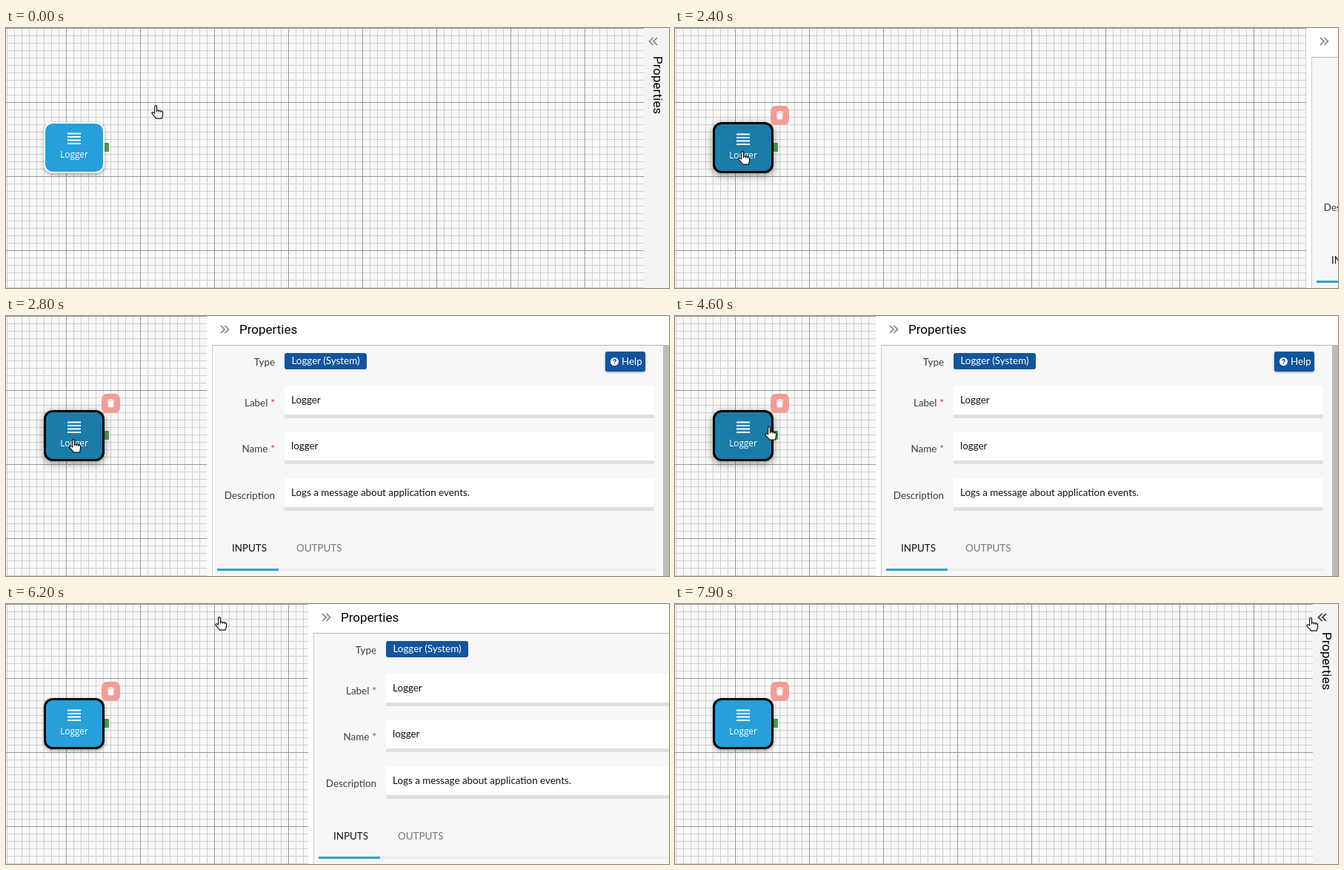
An HTML page that plays this animation: 895x351 px, repeating every 8000 ms.

```html
<!DOCTYPE html>
<html lang="en">
<head>
<meta charset="utf-8">
<title>Flow editor</title>
<style>
  html, body { margin: 0; width: 100%; height: 100%; overflow: hidden; }
  body { position: relative; font: 13.4px/18px Lato, "Open Sans", sans-serif; color: #111; }
  div, svg, span { position: absolute; box-sizing: border-box; white-space: nowrap; }
  svg { overflow: visible; }
  .node, .bin, .panel, .tab, .cursor, .hand, .resize, .back, .back svg, .tab svg {
    animation: 8s step-end infinite;
  }

  #stage {
    inset: 0; overflow: hidden;
    background:
      linear-gradient(90deg, #989898 1px, transparent 1px) 81px 0 / 100px 100px,
      linear-gradient(#989898 1px, transparent 1px) 0 0 / 100px 100px,
      linear-gradient(90deg, #cfcfcf 1px, transparent 1px) 1px 0 / 10px 10px,
      linear-gradient(#cfcfcf 1px, transparent 1px) 0 0 / 10px 10px,
      #f8f8f8;
  }

  .port { left: 133px; top: 155px; width: 6px; height: 12px; background: #4fa052; }
  .node {
    left: 51px; top: 127px; width: 82px; height: 69px; border-radius: 12px;
    border: 2px solid #fff; background: #26a0da; color: #fff;
    animation-name: node;
  }
  .node svg { left: 50%; top: 12px; margin-left: -9px; }
  .node span { left: 0; right: 0; top: 32px; text-align: center; font: 11.8px/18px "Open Sans", sans-serif; }
  .bin {
    left: 129px; top: 105px; width: 25px; height: 26px; border-radius: 7px;
    background: #f29d97; animation-name: bin;
  }

  .panel { left: 271px; top: 0; width: 624px; height: 351px; background: #fff; animation-name: panel; }
  .title { font: 17px/20px Roboto, sans-serif; color: #000; }
  .panel .title { left: 44px; top: 8px; }
  .body {
    left: 7px; top: 39px; width: 617px; height: 312px; background: #f7f7f7;
    border-left: 1px solid #ccc; border-top: 1px solid #b4b4b4;
  }
  .bar { right: 0; top: 40px; width: 8px; height: 311px; background: #bcbcbc; }
  .label { right: 532px; color: #3c3c3c; }
  .label b { color: #d9302c; font-weight: 400; margin-left: 4px; }
  .field {
    left: 105px; width: 499px; height: 44px; padding: 10px 9px;
    background: #fff; border-bottom: 5px solid #e0e0e0;
  }
  .badge {
    left: 105px; top: 50px; width: 111px; height: 22px; border-radius: 3px;
    background: #12559c; color: #fff; text-align: center; line-height: 21px;
  }
  .help {
    left: 538px; top: 48px; width: 54px; height: 27px; border-radius: 3px;
    background: #12559c; color: #fff; line-height: 27px; padding-left: 22px;
    box-shadow: 0 1px 3px rgba(0, 0, 0, .4);
  }
  .help svg { left: 7px; top: 8px; }
  .line { left: 14px; top: 341px; width: 594px; height: 3px; background: #ededed; }
  .line div { width: 83px; height: 3px; background: #26a0da; }
  .back { left: 14px; top: 8px; width: 20px; height: 20px; border-radius: 2px; animation-name: back; }
  .back svg { left: 4px; top: 4px; animation-name: backIcon; }
  .chevrons { fill: none; stroke: #808080; stroke-width: 1.7; }

  .tab { left: 861px; top: 0; width: 34px; height: 351px; background: #f4f4f4; animation-name: tab; }
  .tab svg { left: 6px; top: 12px; animation-name: tabIcon; }
  .tab .title { left: 9px; top: 38px; width: 20px; writing-mode: vertical-rl; }

  .cursor { left: 0; top: 0; animation-name: cursor; }
  .hand { animation-name: hand; }
  .resize { left: -3px; top: -5px; visibility: hidden; animation-name: resize; }
  .hand, .resize { fill: #fff; stroke: #111; stroke-width: 1.2; stroke-linejoin: round; }

  @keyframes node {
    0% { background: #26a0da; border: 2px solid #fff; box-shadow: 0 2px 5px rgba(0, 0, 0, .35); }
    10% { background: #1b7ca9; border: 2px solid #12384d; box-shadow: 0 3px 11px rgba(0, 0, 0, .42); }
    25% { background: #1b7ca9; border: 3px solid #000; box-shadow: 0 3px 11px rgba(0, 0, 0, .42); }
    58.75%, to { background: #26a0da; border: 3px solid #000; box-shadow: 0 2px 5px rgba(0, 0, 0, .35); }
  }
  @keyframes bin { 0% { visibility: hidden; } 25%, to { visibility: visible; } }
  @keyframes panel {
    0% { visibility: hidden; transform: none; }
    30% { visibility: visible; transform: translateX(581px); }
    31.25% { visibility: visible; transform: translateX(450px); }
    32.5% { visibility: visible; transform: translateX(198px); }
    33.75% { visibility: visible; transform: translateX(31px); }
    35% { visibility: visible; transform: none; }
    76.25% { visibility: visible; transform: translateX(8px); }
    77.5% { visibility: visible; transform: translateX(137px); }
    78.75% { visibility: visible; transform: translateX(386px); }
    80% { visibility: visible; transform: translateX(555px); }
    81.25%, to { visibility: hidden; transform: none; }
  }
  @keyframes tab { 0%, 81.25%, to { visibility: visible; } 30% { visibility: hidden; } }
  @keyframes back { 0%, 77.5%, to { background: #fff; } 70% { background: #ececec; } }
  @keyframes backIcon { 0%, 77.5%, to { stroke: #808080; } 70% { stroke: #333; } }
  @keyframes tabIcon { 0% { stroke: #808080; } 98.75%, to { stroke: #333; } }
  @keyframes hand { 0%, 68.75%, to { visibility: visible; } 66.25% { visibility: hidden; } }
  @keyframes resize { 0%, 68.75%, to { visibility: hidden; } 66.25% { visibility: visible; } }
  @keyframes cursor {
    0% { transform: translate(196px, 104px); }
    5% { transform: translate(192px, 106px); }
    7.5% { transform: translate(172px, 112px); }
    8.75% { transform: translate(140px, 126px); }
    10% { transform: translate(118px, 138px); }
    11.25% { transform: translate(107px, 145px); }
    13.75% { transform: translate(92px, 160px); }
    15% { transform: translate(85px, 166px); }
    57.5% { transform: translate(121px, 149px); animation-timing-function: steps(7); }
    66.25% { transform: translate(266px, 34px); }
    68.75% { transform: translate(275px, 24px); }
    70% { transform: translate(282px, 17px); }
    85% { transform: translate(282px, 17px); animation-timing-function: steps(5); }
    91.25% { transform: translate(600px, 36px); animation-timing-function: steps(4); }
    96.25% { transform: translate(843px, 21px); }
    97.5% { transform: translate(848px, 20px); }
    98.75%, to { transform: translate(852px, 18px); }
  }
</style>
</head>
<body>
<div id="stage">
  <div class="port"></div>
  <div class="node">
    <svg width="18" height="17" stroke="#fff" stroke-width="2"><path d="M0 1.5h18M0 6h18M0 10.5h18M0 15h18"/></svg>
    <span>Logger</span>
  </div>
  <div class="bin">
    <svg width="25" height="26" fill="#fff"><path d="M8 8h2.8l.6-1h2.4l.6 1H17v1.3H8zM8.7 10h7.6v7q0 1.2-1.2 1.2H9.9q-1.2 0-1.2-1.2z"/></svg>
  </div>

  <div class="panel">
    <div class="back"><svg class="chevrons" width="13" height="12"><path d="M1 1l5 5-5 5M6.5 1l5 5-5 5"/></svg></div>
    <span class="title">Properties</span>
    <div class="body"></div>
    <div class="bar"></div>
    <span class="label" style="top:53px">Type</span>
    <div class="badge">Logger (System)</div>
    <div class="help">
      <svg width="11" height="11"><circle cx="5.5" cy="5.5" r="5.5" fill="#fff"/><path d="M3.7 4.3q.2-1.6 1.8-1.6 1.7 0 1.7 1.4 0 .8-.9 1.2-.8.4-.8 1.2M5.5 7.5v1.4" fill="none" stroke="#12559c" stroke-width="1.4"/></svg>
      Help
    </div>
    <span class="label" style="top:108px">Label<b>*</b></span>
    <div class="field" style="top:94px">Logger</div>
    <span class="label" style="top:170px">Name<b>*</b></span>
    <div class="field" style="top:156px">logger</div>
    <span class="label" style="top:233px">Description</span>
    <div class="field" style="top:219px">Logs a message about application events.</div>
    <span style="left:34px;top:304px">INPUTS</span>
    <span style="left:121px;top:304px;color:#777">OUTPUTS</span>
    <div class="line"><div></div></div>
  </div>

  <div class="tab">
    <svg class="chevrons" width="13" height="12"><path d="M6.5 1l-5 5 5 5M12 1l-5 5 5 5"/></svg>
    <span class="title">Properties</span>
  </div>

  <div class="cursor">
    <svg class="hand" width="17" height="19">
      <path d="M4.7 11V2.1a1.4 1.4 0 0 1 2.8 0V7l6.2 1.1q2.2.5 2 2.7l-.5 4-1 3.4H6.7l-5.4-6.3q-.8-1.4.4-2 1-.4 1.9.4z"/>
      <path d="M7.5 7v2.6M10.2 7.6v2.2M12.9 8.1v2" stroke-width="1"/>
    </svg>
    <svg class="resize" width="20" height="11"><path d="M1 5.5L6 1v3h8V1l5 4.5-5 4.5V7H6v3z"/></svg>
  </div>
</div>
</body>
</html>
```
